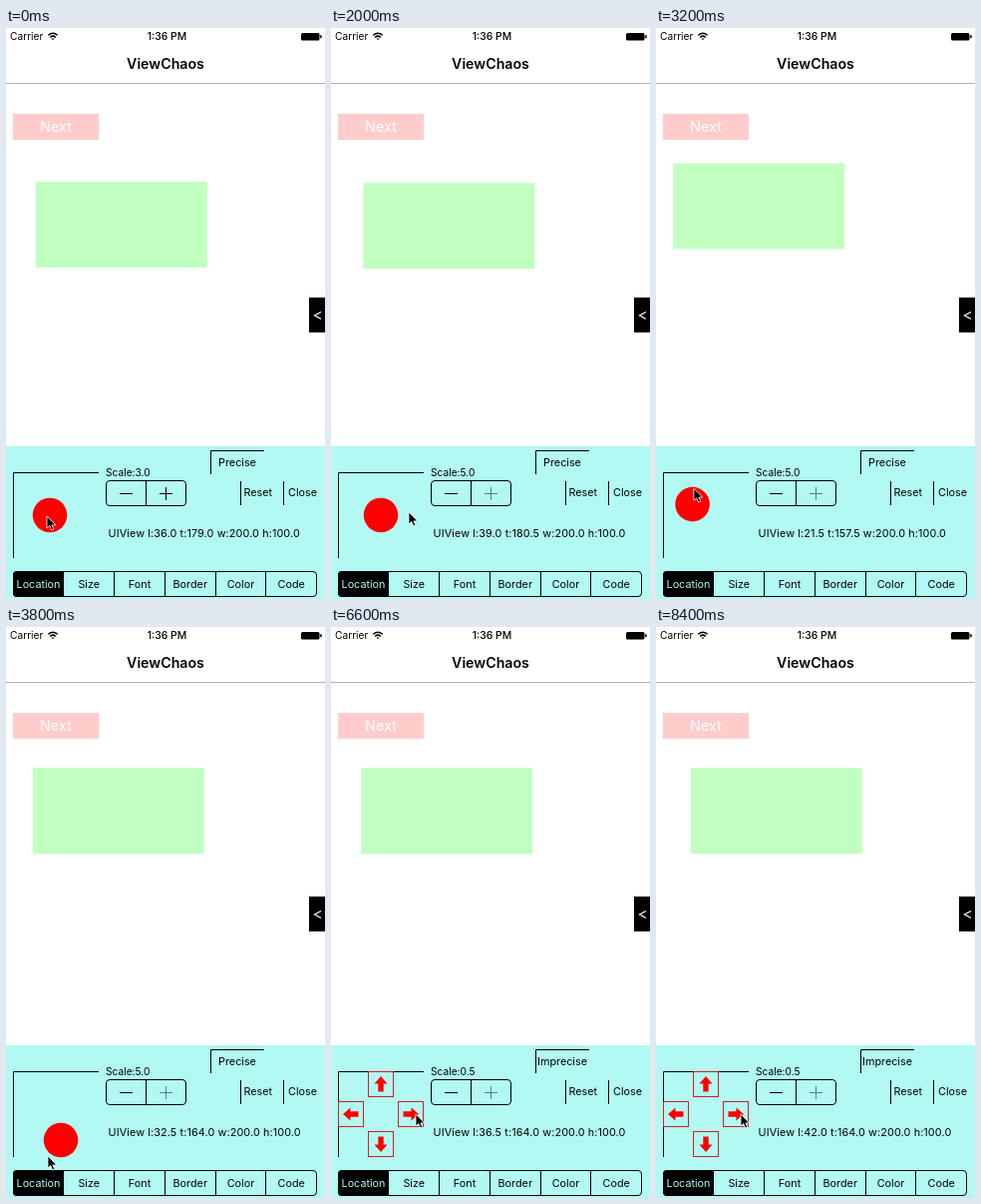
An HTML page for the animation above (8.6 s loop, 320 px wide and 572 px high).

```html
<!DOCTYPE html>
<html>
<head>
<meta charset="utf-8">
<style>
html, body { margin: 0; width: 100%; height: 100%; overflow: hidden; background: #fff; }
svg { display: block; width: 320px; height: 572px; font: 10.8px Inter, Roboto, sans-serif; }
.line { fill: none; stroke: #000; }
.mid { text-anchor: middle; }
.cell { fill: none; stroke: #d02020; }
</style>
</head>
<body>
<svg viewBox="0 0 320 572">
  <!-- status and navigation bars -->
  <text x="4" y="12.3" font-size="10.2">Carrier</text>
  <path class="line" stroke-width="1.5" d="M42.3 7.2Q47 3.2 51.7 7.2M44.2 9.3Q47 7 49.8 9.3"/>
  <path d="M45.5 10.6h3L47 12.2z"/>
  <text class="mid" x="161.5" y="12.3" font-size="10.4" font-weight="500">1:36 PM</text>
  <rect x="296" y="5" width="18.5" height="7.5" rx="1.5"/>
  <rect x="315.2" y="7.2" width="1.5" height="3"/>
  <text class="mid" x="160" y="41" font-size="14.2" font-weight="600">ViewChaos</text>
  <path d="M0 55.5H320" stroke="#b2b2b2"/>

  <rect x="7" y="86" width="86" height="26" fill="#fcc"/>
  <text class="mid" x="50" y="104.2" font-size="14.4" fill="#fff">Next</text>
  <rect id="view" width="172" height="86" fill="#c1ffc1"/>
  <rect x="304" y="270" width="16" height="35"/>
  <path d="M316 284.5L309.5 288L316 291.5" fill="none" stroke="#fff" stroke-width="1.2"/>

  <!-- control panel -->
  <rect y="419" width="320" height="153" fill="#b2f9f3"/>
  <path class="line" d="M7.5 531V445.5H93M205.5 447V423.5H259M235.5 454V478M278.5 454V478"/>
  <text id="scale" x="100" y="448.7" font-size="10.2"></text>
  <text id="mode" class="mid" x="232" y="439"></text>
  <text class="mid" x="252.7" y="469">Reset</text>
  <text class="mid" x="297.5" y="469">Close</text>
  <text id="info" x="102.5" y="509.5" letter-spacing=".12"></text>
  <rect class="line" x="100.5" y="453.5" width="80" height="25" rx="3.5"/>
  <path class="line" d="M140.5 454V479M114 466.5H127"/>
  <path id="plus" class="line" d="M154 466.5H167M160.5 460V473"/>
  <circle id="ball" r="17.3" fill="red"/>
  <g id="arrows"></g>
  <g id="tabs"></g>
  <path id="cursor" d="M0 0V12L2.8 9.6L4.8 14L6.8 13L4.9 8.9H8.8Z" stroke="#fff" stroke-width=".8"/>
</svg>
<script>
const $ = id => document.getElementById(id);

$('tabs').innerHTML = '<path d="M58 544H11Q7 544 7 548V566Q7 570 11 570H58Z"/>' +
  '<rect class="line" x="7.5" y="544.5" width="304" height="25" rx="3.5"/>' +
  ['Location', 'Size', 'Font', 'Border', 'Color', 'Code'].map((name, i) => {
    const x = 7.1 + i * 50.75;
    const divider = i ? `<path class="line" d="M${Math.floor(x) + .5} 544V570"/>` : '';
    return `${divider}<text class="mid" x="${x + 25.4}" y="561" fill="${i ? '#000' : '#b2f9f3'}">${name}</text>`;
  }).join('');

$('arrows').innerHTML = [0, 90, 180, 270].map(turn => {
  const a = turn * Math.PI / 180;
  return `<g transform="translate(${50 + 30 * Math.sin(a)} ${488 - 30 * Math.cos(a)}) rotate(${turn})">
    <rect class="cell" x="-12.5" y="-12.5" width="25" height="25"/>
    <path fill="red" d="M0 -8L6.5 -.5H2.7V7.5H-2.7V-.5H-6.5Z"/></g>`;
}).join('');

// Turning points of each motion: time, x, y
const DRAG = [[2400, 39, 180.5], [2800, 53, 167.5], [3500, 1.5, 151], [3800, 32.5, 164]];
const BALL = [[0, 44, 488], [400, 50, 488], [2400, 50, 488], [2800, 50, 482], [3500, 28, 474],
  [3800, 55, 514], [4000, 50, 488]];
const CURSOR = [[0, 41, 489], [1200, 158, 463], [1600, 158, 463], [2000, 78, 485], [2400, 48, 484],
  [2800, 55, 460], [3500, 27, 462], [3800, 42, 530], [4400, 228, 433], [5000, 111, 476], [5200, 85, 488]];

const clamp = (v, lo, hi) => Math.min(hi, Math.max(lo, v));
const progress = (t, from, to) => clamp((t - from) / (to - from), 0, 1);
const half = v => Math.round(v * 2) / 2;

// Eases from one turning point to the next
function along(keys, t) {
  let [, x, y] = keys[0];
  for (let i = 1; i < keys.length; i++) {
    const p = progress(t, keys[i - 1][0], keys[i][0]);
    const e = (1 - Math.cos(Math.PI * p)) / 2;
    x += (keys[i][1] - keys[i - 1][1]) * e;
    y += (keys[i][2] - keys[i - 1][2]) * e;
  }
  return [x, y];
}

const move = (id, x, y) => $(id).setAttribute('transform', `translate(${x} ${y})`);

function draw(now) {
  const t = Math.floor(now % 8600 / 200) * 200;
  const precise = t >= 4600;
  const scale = precise ? .5 : clamp(3 + Math.floor((t - 800) / 400), 3, 5);
  let [left, top] = along(DRAG, t);
  // First small drag, then 19 half-point steps with the right arrow
  const nudge = progress(t, 0, 600) - 1;
  left = half(left + 3 * nudge + 9.5 * progress(t, 5400, 8400));
  top = half(top + 1.5 * nudge);

  move('view', left * .86 - 1.2, top * .86);
  move('ball', ...along(BALL, t));
  move('cursor', ...along(CURSOR, t));
  $('ball').style.display = precise ? 'none' : '';
  $('arrows').style.display = precise ? '' : 'none';
  $('plus').style.stroke = t < 1600 ? '#000' : '#59807d';
  $('scale').textContent = 'Scale:' + scale.toFixed(1);
  $('mode').textContent = precise ? 'Imprecise' : 'Precise';
  $('info').textContent = `UIView l:${left.toFixed(1)} t:${top.toFixed(1)} w:200.0 h:100.0`;
}

let start;
function tick(now) {
  start ??= now;
  draw(now - start);
  requestAnimationFrame(tick);
}
draw(0);
requestAnimationFrame(tick);
</script>
</body>
</html>
```
